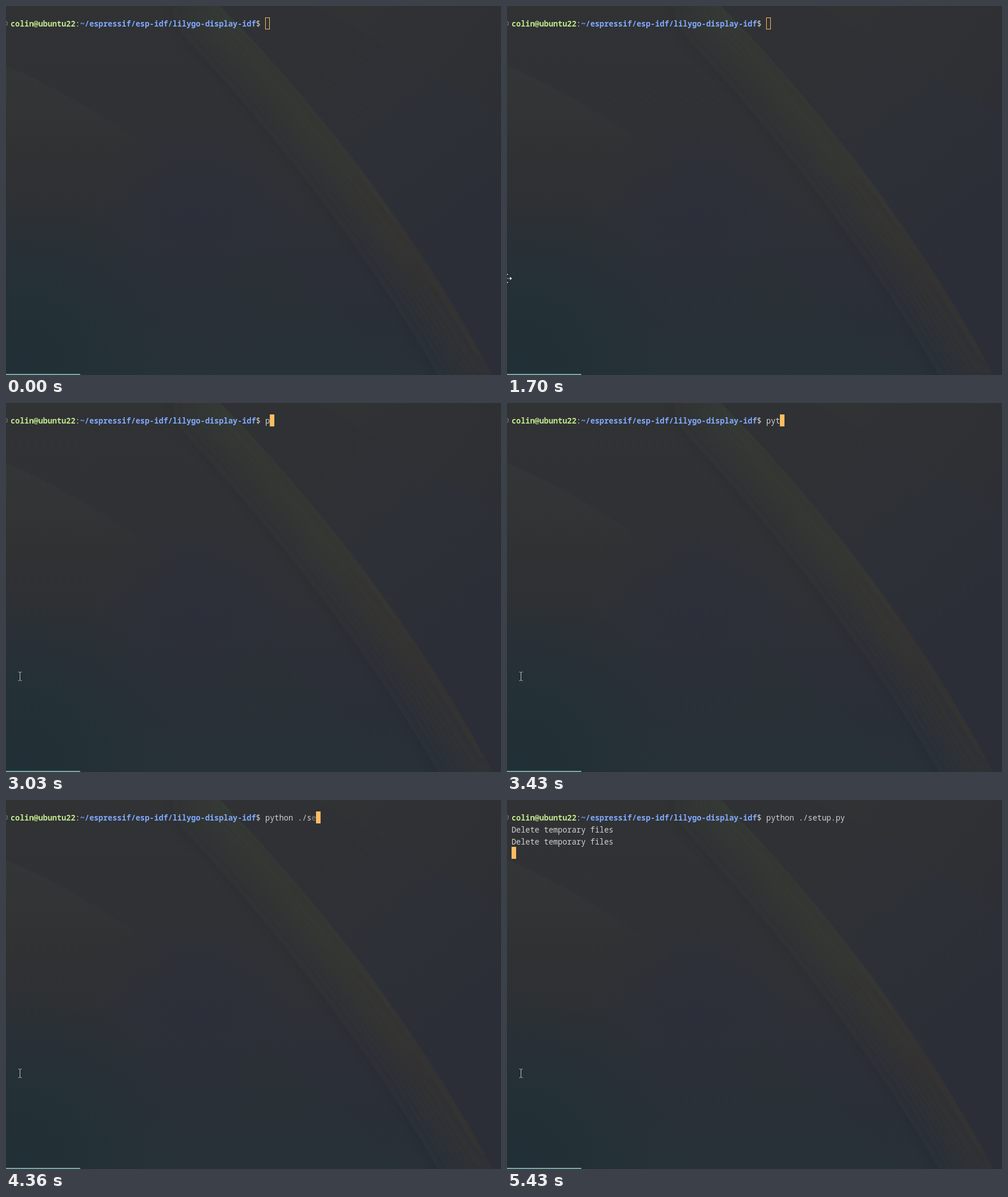
An HTML page for the animation above (8 s loop, 867 px wide and 646 px high).

```html
<!DOCTYPE html>
<html lang="en">
<head>
<meta charset="utf-8">
<title>Terminal</title>
<style>
  html, body { margin: 0; width: 100%; height: 100%; overflow: hidden; background: #2e3134; }
  svg { display: block; width: 867px; height: 646px; }
  text { font: 13.52px "Noto Sans Mono", "DejaVu Sans Mono", monospace; fill: #d2d2d0; white-space: pre; }
  .user { font-weight: 700; fill: #c3e88d; }
  .path { font-weight: 700; fill: #82aaff; }
</style>
</head>
<body>
<svg viewBox="0 0 867 646">
  <defs>
    <linearGradient id="mid" x1="0" y1="0" x2="0" y2="1">
      <stop offset="0" stop-color="#303234"/>
      <stop offset=".45" stop-color="#2f3135"/>
      <stop offset=".72" stop-color="#2c2f37"/>
      <stop offset="1" stop-color="#283038"/>
    </linearGradient>
    <linearGradient id="low" gradientUnits="userSpaceOnUse" x1="60" y1="110" x2="60" y2="646">
      <stop offset="0" stop-color="#333636"/>
      <stop offset=".3" stop-color="#303133"/>
      <stop offset=".58" stop-color="#2c3035"/>
      <stop offset="1" stop-color="#273138"/>
    </linearGradient>
    <linearGradient id="right" gradientUnits="userSpaceOnUse" x1="540" y1="60" x2="820" y2="420">
      <stop offset="0" stop-color="#2f3134"/>
      <stop offset=".5" stop-color="#2d3036"/>
      <stop offset="1" stop-color="#2b2e36"/>
    </linearGradient>
    <linearGradient id="corner" gradientUnits="userSpaceOnUse" x1="620" y1="0" x2="860" y2="180">
      <stop offset="0" stop-color="#303234"/>
      <stop offset="1" stop-color="#2d2f34"/>
    </linearGradient>
    <radialGradient id="teal" gradientUnits="userSpaceOnUse" cx="20" cy="630" r="300">
      <stop offset="0" stop-color="#213036"/>
      <stop offset=".4" stop-color="#223036" stop-opacity=".85"/>
      <stop offset="1" stop-color="#253138" stop-opacity="0"/>
    </radialGradient>
    <radialGradient id="blue" gradientUnits="userSpaceOnUse" cx="330" cy="370" r="190">
      <stop offset="0" stop-color="#2c2f3a" stop-opacity=".9"/>
      <stop offset="1" stop-color="#2c2f3a" stop-opacity="0"/>
    </radialGradient>
    <linearGradient id="edge" x1="0" y1="0" x2="0" y2="1">
      <stop offset="0" stop-color="#363a35"/>
      <stop offset=".35" stop-color="#363832"/>
      <stop offset=".7" stop-color="#343332"/>
      <stop offset="1" stop-color="#2f3135"/>
    </linearGradient>
    <filter id="soft" filterUnits="userSpaceOnUse" x="0" y="-100" width="1000" height="850">
      <feGaussianBlur stdDeviation="26"/>
    </filter>
    <clipPath id="leftSide">
      <path d="M0 0H375C505 134 690 342 852 646H0Z"/>
    </clipPath>
  </defs>

  <rect width="867" height="646" fill="url(#right)"/>
  <path d="M538 0C650 58 760 126 867 189V0Z" fill="url(#corner)"/>
  <g clip-path="url(#leftSide)">
    <rect width="867" height="646" fill="url(#mid)"/>
    <path d="M350 -30C490 120 680 340 862 666" fill="none" stroke="url(#edge)" stroke-width="90" filter="url(#soft)"/>
    <path d="M0 105C125 157 250 242 350 326S540 500 690 646H0Z" fill="url(#low)"/>
    <rect width="867" height="646" fill="url(#blue)"/>
    <rect width="400" height="646" fill="url(#teal)"/>
  </g>

  <rect y="644" width="130" height="2" fill="#78aaa5"/>
  <circle cx="-1" cy="30.5" r="3.5" fill="none" stroke="#737577" stroke-width="1.2"/>

  <text x="8" y="36"><tspan class="user">colin@ubuntu22</tspan>:<tspan class="path">~/espressif/esp-idf/lilygo-display-idf</tspan>$ <tspan id="typed"></tspan><tspan id="faint" fill="#85878a"></tspan></text>
  <g id="output">
    <text x="8" y="57">Delete temporary files</text>
    <text x="8" y="77.5">Delete temporary files</text>
  </g>
  <rect id="caret" stroke="#ffbd62"/>

  <g id="move" fill="#f4f4f4" stroke="#17191b" stroke-width=".6">
    <path d="M-10 0L-6 -3.5V-.7H-.7V-6H-4L0 -10L4 -6H.7V-.7H6V-3.5L10 0L6 3.5V.7H.7V6H4L0 10L-4 6H-.7V.7H-6V3.5Z"/>
  </g>
  <g id="beam" fill="none">
    <path d="M-3 -7.5H-1L0 -6.5L1 -7.5H3M0 -6.5V6.5M-3 7.5H-1L0 6.5L1 7.5H3" stroke="#16181a" stroke-width="2.2"/>
    <path d="M-3 -7.5H-1L0 -6.5L1 -7.5H3M0 -6.5V6.5M-3 7.5H-1L0 6.5L1 7.5H3" stroke="#d8d8d8"/>
  </g>
</svg>
<script>
const LOOP = 8000, CELL = 8.112, ROW = 20.6;
const FOCUS = 2100, ENTER = 5300, PRINT = 5430;
const COMMAND = "python ./setup.py ";

// [time, characters typed, whether the newest is still faint]
const keys = [
  [0, 0], [3030, 1], [3230, 2, true], [3300, 2], [3430, 3],
  [3500, 4, true], [3560, 4], [3630, 5], [3700, 6], [3760, 7],
  [3960, 8, true], [4100, 9, true], [4160, 9], [4300, 10],
  [4360, 11, true], [4430, 11], [4500, 12], [4700, 18]
];

// [time, pointer shape, x, y]
const pointer = [
  [0], [500, "move", -8, 610], [570, "move", -7, 610], [630],
  [1700, "move", -1, 477], [1760, "beam", 6, 482], [1830, "beam", 13, 484],
  [1900, "beam", 19, 482], [1960, "beam", 23, 480], [2030, "beam", 24.5, 478.5]
];

const $ = id => document.getElementById(id);
const latest = (steps, t) => steps.findLast(step => step[0] <= t);
const show = (id, on) => $(id).setAttribute("visibility", on ? "visible" : "hidden");

function attrs(id, values) {
  for (const key in values) $(id).setAttribute(key, values[key]);
}

function drawCaret(t, count) {
  const col = t < ENTER ? 55 + count : 0;
  const row = t < ENTER ? 0 : t < PRINT ? 1 : 3;
  const x = Math.round(8 + col * CELL), y = Math.round(20 + row * ROW);
  const focused = t >= FOCUS;
  attrs("caret", {
    x: x + .5, y: y + .5, width: 7, height: 20,
    fill: focused ? "#ffbd62" : "none"
  });
}

function drawPointer(t) {
  const [, shape, x, y] = latest(pointer, t);
  for (const id of ["move", "beam"]) show(id, id === shape);
  if (shape) attrs(shape, { transform: `translate(${x} ${y})` });
}

function render(t) {
  const [, count, faint] = latest(keys, t);
  const solid = faint ? count - 1 : count;
  $("typed").textContent = COMMAND.slice(0, solid);
  $("faint").textContent = COMMAND.slice(solid, count);
  show("output", t >= PRINT);
  drawCaret(t, count);
  drawPointer(t);
}

let start;
function tick(now) {
  start ??= now;
  render((now - start) % LOOP);
  requestAnimationFrame(tick);
}
render(0);
requestAnimationFrame(tick);
</script>
</body>
</html>
```
